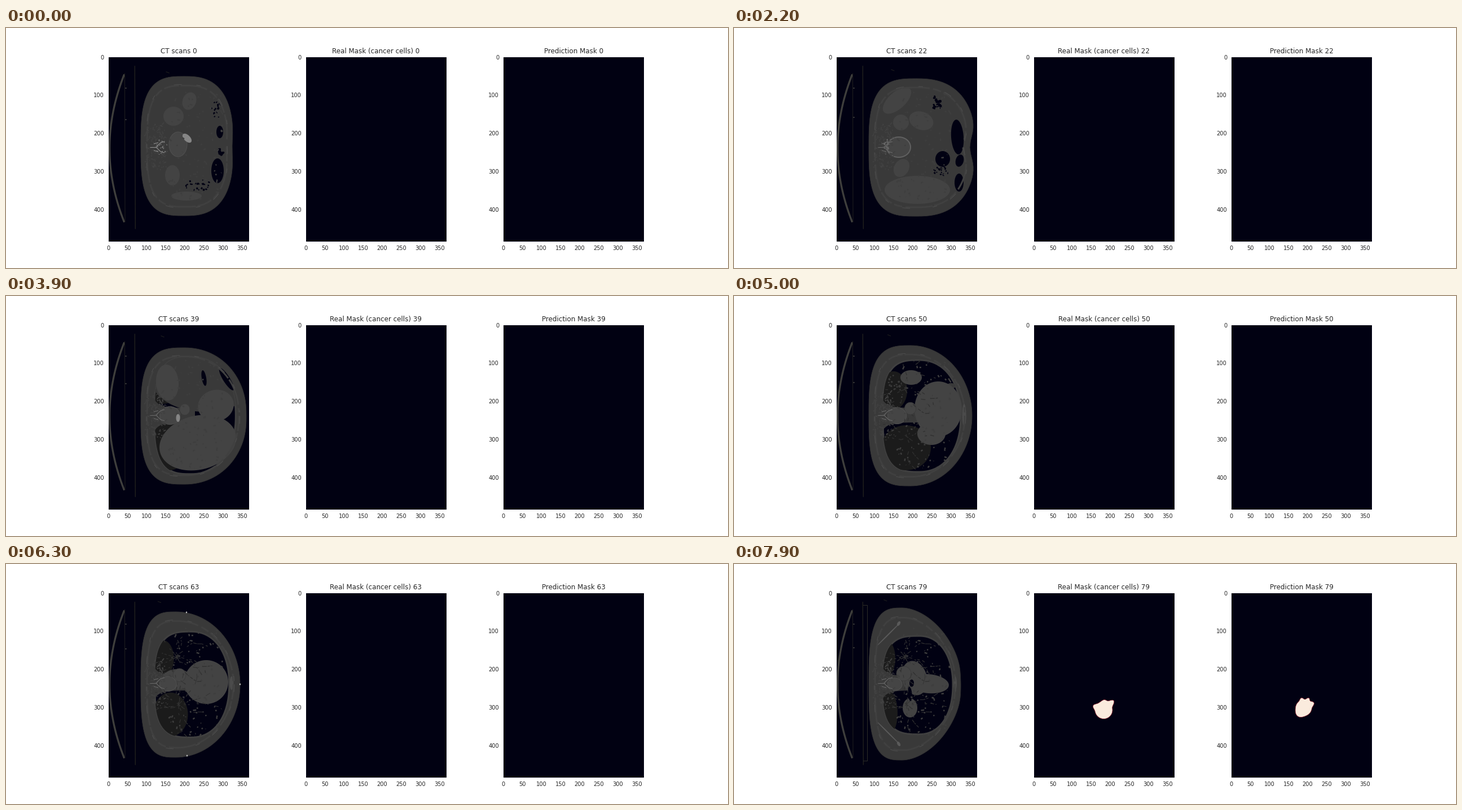
A matplotlib script for the animation above (8 s loop, 1280x427 px).

```python
import numpy as np
import matplotlib.pyplot as plt
from matplotlib.animation import FuncAnimation
from matplotlib.collections import LineCollection
from matplotlib.patches import Polygon
from matplotlib.transforms import Affine2D

W, H, DPI = 1280, 427, 64
PT = 10 / 9          # text scale on this stage
PX = 72 / DPI        # one pixel in points
FRAMES = 80
KEYS = (0, 12, 22, 39, 50, 63, 79)   # slices at which the body outline is measured
CX, CY = 325, 212                    # middle of the body
LUNGS_FROM = 34

AIR, HAZE, FAT = "#010112", "#1b1b1b", "#393939"
MUSCLE, ORGAN, BONE, BRIGHT = "#404040", "#434343", "#5a5a5a", "#858585"

rng = np.random.default_rng(7)
plt.rcParams["font.family"] = "DejaVu Sans"
fig, axes = plt.subplots(1, 3, figsize=(W / DPI, H / DPI), dpi=DPI, facecolor="white")
stage = Affine2D().scale(1 / W, -1 / H).translate(0, 1) + fig.transFigure

for ax in axes:
    ax.set(facecolor=AIR, xlim=(-0.5, 368.5), ylim=(484.5, -0.5), aspect="equal",
           xticks=range(0, 351, 50), yticks=range(0, 401, 100))
    ax.spines[:].set(color="white", linewidth=PX)
    ax.tick_params(length=0, pad=7 * PT, labelsize=10 * PT, labelcolor="0.15")
scan = axes[0]

ANGLES = np.linspace(0, 2 * np.pi, 120, endpoint=False)
COS, SIN = np.cos(ANGLES), np.sin(ANGLES)


def ellipse(cx, cy, rx, ry, tilt=0):
    r = np.radians(tilt)
    x, y = rx * COS, ry * SIN
    return np.column_stack([cx + x * np.cos(r) - y * np.sin(r),
                            cy + x * np.sin(r) + y * np.cos(r)])


def barrel(left, right, top, bottom, apex, right_power, left_power=3.1):
    """Superellipse whose left and right halves have their own width and roundness."""
    power = np.where(COS > 0, right_power, left_power)
    width = np.where(COS > 0, right - apex, apex - left)
    x = apex + width * np.sign(COS) * np.abs(COS) ** (2 / power)
    y = (top + bottom) / 2 + (bottom - top) / 2 * np.sign(SIN) * np.abs(SIN) ** (2 / power)
    return np.column_stack([x, y])


def blob(cx, cy, radius, *bumps):
    """Circle with bumps given as angle in degrees, height and width in radians."""
    r = np.full_like(ANGLES, radius, dtype=float)
    for angle, height, width in bumps:
        off = np.angle(np.exp(1j * (ANGLES - np.radians(angle))))
        r += height * np.exp(-(off / width) ** 2)
    return np.column_stack([cx + r * COS, cy + r * SIN])


def body_outline(n):
    def at(*values):
        return np.interp(n, KEYS, values)

    xy = barrel(239, at(403, 421, 428, 427, 422, 415, 405),
                at(86, 88, 90, 92, 88, 85, 78), at(334, 336, 335, 335, 338, 344, 349),
                at(316, 322, 323, 316, 313, 301, 298), at(2.7, 2.7, 2.5, 2.1, 2, 2, 1.8))
    dent = at(2, 11, 10, 1, 0, 0, 3) * np.exp(-((xy[:, 1] - 212) / 28) ** 2)
    xy[:, 0] -= np.where(COS > 0, dent, 0)
    return xy


def chest_outline(n):
    t = (n - 50) / 29
    return barrel(264, 402 - 14 * t, 114 + 14 * t, 313 - 10 * t, 328, 2.2)


def add_patch(face, edge="none", lw=0.0, clip=None, ax=scan):
    patch = ax.add_patch(Polygon(np.zeros((3, 2)), fc=face, ec=edge, lw=lw * PX, transform=stage))
    if clip:
        patch.set_clip_path(clip)
    return patch


def add_strokes(segments, color, lw, clip=None):
    lines = LineCollection(segments, colors=color, linewidths=lw * PX, transform=stage)
    scan.add_collection(lines, autolim=False)
    if clip:
        lines.set_clip_path(clip)
    return lines


def add_line(x, y, color, lw, **kw):
    return scan.plot(x, y, color=color, lw=lw * PX, transform=stage,
                     scalex=False, scaley=False, **kw)[0]


organs = []


def organ(tone, *rows, tail=8, clip=None, edge="none", lw=0.0):
    """Ellipse that follows rows of (slice, x, y, rx, ry, tilt), then shrinks away."""
    organs.append((add_patch(tone, edge, lw, clip), np.array(rows, float), tail))


def bubbles(n, cx, cy, rx, ry, count, size=2.0, tone=AIR):
    for a, r in zip(rng.uniform(0, 2 * np.pi, count), np.sqrt(rng.random(count))):
        w, h = size * rng.uniform(0.4, 1, 2)
        organ(tone, (n, cx + rx * r * np.cos(a), cy + ry * r * np.sin(a), w, h, rng.uniform(0, 90)))


# Scanner table
ty = np.linspace(84, 344, 80)
tx = 183.6 + 25.5 * ((ty - 214) / 130) ** 2
add_line(tx, ty, "#4e4e49", 3)
add_line(tx, ty, "#2a2a2a", 0.8)
add_line([210.5, 211], [81, 345], "#20201f", 1)
add_line([228.3, 229.3], [68, 357], "#23231f", 1.3)
add_line([211.5, 212.5], [107, 107], "#4a4a46", 1.5)
peg = add_line([], [], "#4a4a46", 1.5)
mark = add_line([], [], "#22221f", 1)
rail = add_line([229, 235.5, 235.5, 229], [73, 73, 350, 350], "#2c2c28", 1)

# Body wall, ribs and mottled tissue
body = add_patch(FAT, "#333333", 0.8)
wall = add_line([], [], MUSCLE, 3, dashes=(9, 1, 16, 2, 5, 1.5))
ribs = add_line([], [], "#4e4e4e", 1, dashes=(14, 26, 8, 40))


def mottle(count, x0, x1, y0, y1, color, lw):
    p = np.column_stack([rng.uniform(x0, x1, count), rng.uniform(y0, y1, count)])
    add_strokes(np.stack([p, p + rng.normal(0, 2.2, (count, 2))], 1), color, lw, body)


mottle(110, 290, 385, 115, 310, "#3e3e3e", 2.4)
mottle(110, 246, 286, 172, 252, MUSCLE, 2)
mottle(40, 246, 286, 172, 252, "#484848", 0.8)

# Chest cavity with its vessels
chest = add_patch(AIR, MUSCLE, 3)
organ(HAZE, (39, 276, 178, 25, 14, 0), (50, 283, 168, 24, 34, 0), (79, 273, 168, 13, 30, 0), clip=chest)
organ(HAZE, (39, 290, 262, 34, 48, 0), (50, 305, 270, 44, 40, 0), (79, 275, 265, 15, 38, 0), clip=chest)


def branches(x, y, count):
    """Segments of vessels that wander out from the root of a lung."""
    segs = []
    for a in np.linspace(0, 2 * np.pi, count, endpoint=False):
        p = np.array([x, y])
        for _ in range(9):
            a += rng.normal(0, 0.25)
            q = p + rng.uniform(5, 10) * np.array([np.cos(a), np.sin(a)])
            segs.append([p, p + (q - p) * rng.uniform(0.3, 1)])
            p = q
    return segs


tree = branches(303, 166, 14) + branches(306, 250, 14)
rng.shuffle(tree)
sparse = add_strokes(tree[::3], "#303030", 1.3, chest)
dense = add_strokes(tree[1::3], "#343434", 1, chest)

# Diaphragm dome and the tissue around the spine, both covering the cavity
organ(FAT, (33, 335, 205, 130, 160, 0), (39, 352, 146, 95, 60, 0), (50, 385, 160, 8, 5, 0),
      tail=1, clip=chest)
nx = np.linspace(252, 335, 40)
nh = 13 + 18 * np.exp(-np.maximum(nx - 261, 0) / 10)
neck = add_patch(FAT)
neck.set_xy(np.column_stack([np.r_[nx, nx[::-1]], CY + np.r_[-nh, nh[::-1]]]))

# Bowel, kidneys, stomach, spleen, liver
organ(ORGAN, (0, 325, 130, 12, 16, 20), (12, 325, 135, 20, 12, 10))
organ(ORGAN, (0, 297, 157, 18, 17, 0), (12, 297, 160, 19, 20, 0), (22, 296, 168, 14, 14, 0))
organ(ORGAN, (0, 295, 262, 13, 18, 0), (12, 296, 257, 15, 22, 35), (22, 297, 249, 13, 17, 30))
organ(ORGAN, (12, 345, 172, 18, 24, -15), (22, 332, 165, 22, 16, 20), (39, 372, 195, 32, 28, -15))
organ(ORGAN, (22, 289, 129, 31, 15, -42), (39, 286, 154, 20, 32, -5), (50, 314, 145, 19, 13, 0))
organ(ORGAN, (0, 320, 299, 27, 8, 0), (12, 325, 296, 44, 22, 0), (22, 325, 288, 58, 25, 0),
      (39, 340, 261, 69, 48, -14), (44, 350, 245, 50, 40, 0))

# Heart and great vessels
organ(ORGAN, (46, 364, 205, 38, 44, 0), (50, 362, 201, 42, 49, 0), (63, 355, 210, 39, 39, 0),
      (79, 345, 213, 36, 17, 5))
organ(ORGAN, (63, 303, 205, 26, 18, 0), (79, 320, 203, 22, 31, -15))
organ(ORGAN, (79, 312, 256, 13, 17, 0))
organ("#454545", (39, 317, 202, 9, 10, 0), (79, 301, 195, 13, 13, 0), edge="#3a3a3a", lw=0.8)

# Bones
organ("#454545", (0, 305, 207, 16, 22, 0), (22, 293, 212, 20, 18, 0), (79, 285, 214, 13, 11, 0),
      edge="#505050", lw=1)
organ("none", (22, 292, 212, 21, 18, 0), edge="#606060", lw=2)
organ(BRIGHT, (0, 321, 196, 10, 5.5, 45), tail=6)
organ(BONE, (12, 316, 212, 5, 15, 0), tail=6)
organ(BRIGHT, (39, 305, 217, 3.5, 7, 0), tail=6)
organ("#4b4b4b", (50, 408, 212, 3.5, 20, 0), (63, 400, 212, 3.5, 12, 0), (79, 392, 212, 3, 12, 0))
bubbles(0, 275, 212, 12, 14, 24, 1.5, "#7c7c7c")
bubbles(22, 272, 212, 7, 14, 14, 2, "#686868")
for side in (-1, 1):
    organ(BONE, (79, 273, 213 + 87 * side, 30, 1, 45 * side))
    organ(BONE, (79, 292, 213 + 107 * side, 2.5, 4.5, -30 * side))
fork = [[(255, CY), (266, CY)]]
for side in (-1, 1):
    fork += [[(266, CY), (274, CY + 8 * side)], [(274, CY + 8 * side), (281, CY + 10 * side)],
             [(262, CY + 6 * side), (270, CY + 8 * side)]]
spine = add_strokes(fork, BONE, 1.2)

# Gas
for row in ((0, 379, 185, 6, 11, 0), (0, 375, 254, 11, 22, 0), (12, 386, 152, 7, 24, -18),
            (12, 393, 226, 6, 9, 0), (22, 396, 194, 11, 31, -4), (22, 370, 233, 13, 14, 0),
            (22, 400, 236, 7, 11, 15), (22, 399, 275, 8, 16, 0), (39, 391, 148, 6, 23, -32),
            (39, 351, 146, 4, 14, -10), (79, 315, 212, 4, 6.5, 0), (79, 312, 231, 3.5, 13, -5)):
    organ(AIR, row)
bubbles(0, 372, 146, 10, 16, 18)
bubbles(0, 379, 223, 6, 8, 9, 4)
bubbles(0, 340, 279, 24, 11, 24)
bubbles(12, 380, 143, 9, 18, 18)
bubbles(12, 345, 255, 22, 12, 14, 1.3)
bubbles(22, 360, 134, 8, 14, 22, 3)
bubbles(22, 368, 255, 15, 8, 20)
bubbles(50, 285, 155, 12, 14, 16, 2.4, FAT)

# Electrodes on the skin
for x, y in ((320, 86), (415, 214), (321, 341)):
    organ("#c0c0c0", (63, x, y, 1.2, 1.5, 0), tail=4)

# Masks
truth = blob(655.5, 260, 15.5, (-44, 9, 0.27), (-157, 5, 0.3), (-85, 3, 0.35))
guess = blob(1010, 256, 14.3, (-27, 6, 0.3), (-63, 5.5, 0.22), (-103, 4, 0.25), (126, 4, 0.6))
masks = [(xy, add_patch("#faebdd", "#8a1a2c", 0.7, ax=ax)) for ax, xy in zip(axes[1:], (truth, guess))]

TITLES = ("CT scans", "Real Mask (cancer cells)", "Prediction Mask")


def scaled(xy, size, mid):
    return mid + (xy - mid) * size


def draw(n):
    for ax, text in zip(axes, TITLES):
        ax.set_title(f"{text} {n}", fontsize=12 * PT, pad=6 * PT, color="0.15")

    skin = body_outline(n)
    body.set_xy(skin)
    wall.set_data(*scaled(skin, 0.87, (CX, CY)).T)
    ribs.set_data(*scaled(skin, 0.885, (CX, CY)).T)
    chest.set_xy(chest_outline(n))
    for part in (chest, neck):
        part.set_visible(n >= LUNGS_FROM)
    sparse.set_visible(n > 41)
    dense.set_visible(n > 55)

    for patch, rows, tail in organs:
        away = max(rows[0, 0] - n, n - rows[-1, 0], 0)
        patch.set_visible(away < tail and (patch.get_clip_path() is None or n >= LUNGS_FROM))
        if away < tail:
            cx, cy, rx, ry, tilt = (np.interp(n, rows[:, 0], col) for col in rows.T[1:])
            size = np.sqrt(1 - away / tail)
            patch.set_xy(ellipse(cx, cy, rx * size, ry * size, tilt))

    spine.set_color(str(np.interp(n, (0, 22, 79), (0.55, 0.4, 0.4))))
    py = 162.5 - 0.175 * n
    peg.set_data([211.5, 212.5], [py, py])
    mx, my = 287 - 0.23 * n, 79 - 0.18 * n
    mark.set_data([mx - 3, mx + 2], [my - 1, my + 1])
    rail.set_visible(n >= 72)

    grow = np.sqrt(np.clip((n - 73) / 6, 0, 1))
    for xy, patch in masks:
        patch.set_xy(scaled(xy, grow, xy.mean(axis=0)))
        patch.set_visible(grow > 0)


anim = FuncAnimation(fig, draw, frames=FRAMES, interval=100, init_func=lambda: draw(0),
                     repeat=True, repeat_delay=0)
plt.show()
```
